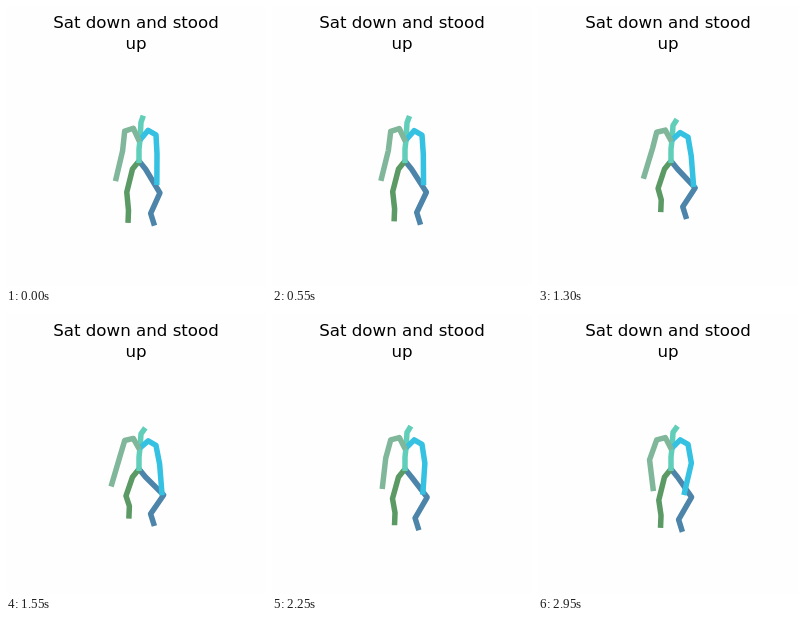
Recreate the animation shown at these times as an HTML page with a canvas. Size 260 by 280 pixels, loop 3000 ms.

```html
<!DOCTYPE html>
<html>
<head>
<meta charset="utf-8">
<style>
html, body { margin: 0; width: 260px; height: 280px; overflow: hidden; background: #fefefe; }
canvas { display: block; }
</style>
</head>
<body>
<canvas id="stage" width="260" height="280"></canvas>
<script>
const ctx = document.getElementById('stage').getContext('2d');
const LOOP = 3000, STEP = 50, LOWEST = 1550;

function limb(color, ...points) {
  ctx.strokeStyle = color;
  ctx.beginPath();
  points.forEach(p => ctx.lineTo(...p));
  ctx.stroke();
}

function drawTitle() {
  ctx.fillStyle = '#000';
  ctx.font = '16.67px "DejaVu Sans", sans-serif';
  ctx.textAlign = 'center';
  ctx.fillText('Sat down and stood', 130, 22);
  ctx.fillText('up', 130, 43);
}

function drawFigure(t) {
  // sit rises and falls around the lowest point; drift shifts the pose late in the loop.
  const sit = Math.exp(-(((t - LOWEST) / 700) ** 2));
  const drift = (t / (LOOP - STEP)) ** 3;
  const joint = (x, y, [sx, sy], [dx, dy]) =>
    [x + sx * sit + dx * drift, y + sy * sit + dy * drift];

  const root = [133, 155], chest = [134, 134];
  const head = joint(137.3, 109.5, [1.7, 4], [2.2, 2.5]);
  const drop = head[1] - 109;
  const shinR = (x, y) => joint(x, y, [0.5, -7.4], [-4.1, -1.7]);
  const shinL = (x, y) => joint(x, y, [0.8, -12], [0.5, -3]);

  ctx.lineWidth = 5.5;
  ctx.lineJoin = 'round';
  limb('#4D84AA', root, [139.5, 163],
    joint(153.9, 187, [3.8, -5.5], [-0.4, -3.8]),
    shinR(144.7, 207.5), shinR(148.5, 219.7));
  limb('#5B9965', root, [126.5, 163],
    joint(120.8, 186.2, [-0.8, -4.3], [0, 0]),
    shinL(122.5, 204.5), shinL(122, 217));
  limb('#61CEB9', [133, 157], [133, 143], chest, [135, 116 + drop * 0.8], head);
  limb('#34C1E2', chest,
    [142.2, 124 + drop * 0.6], [150, 128.5 + drop * 0.6],
    joint(151, 148, [2.3, 2], [2.3, 1]),
    joint(150.8, 179, [6, 2], [-5, 2]));
  limb('#80B79A', [133.5, 135.5],
    [127.3, 122 + drop * 0.5], [118.7, 125 + drop * 0.3],
    joint(116.6, 145, [-1.8, -3.2], [-5, 1]),
    joint(109.5, 175.2, [-5.3, -3], [6, 2]));
}

function tick() {
  const t = performance.now() % LOOP;
  ctx.fillStyle = '#fefefe';
  ctx.fillRect(0, 0, 260, 280);
  drawTitle();
  drawFigure(Math.floor(t / STEP) * STEP);
  requestAnimationFrame(tick);
}
tick();
</script>
</body>
</html>
```
